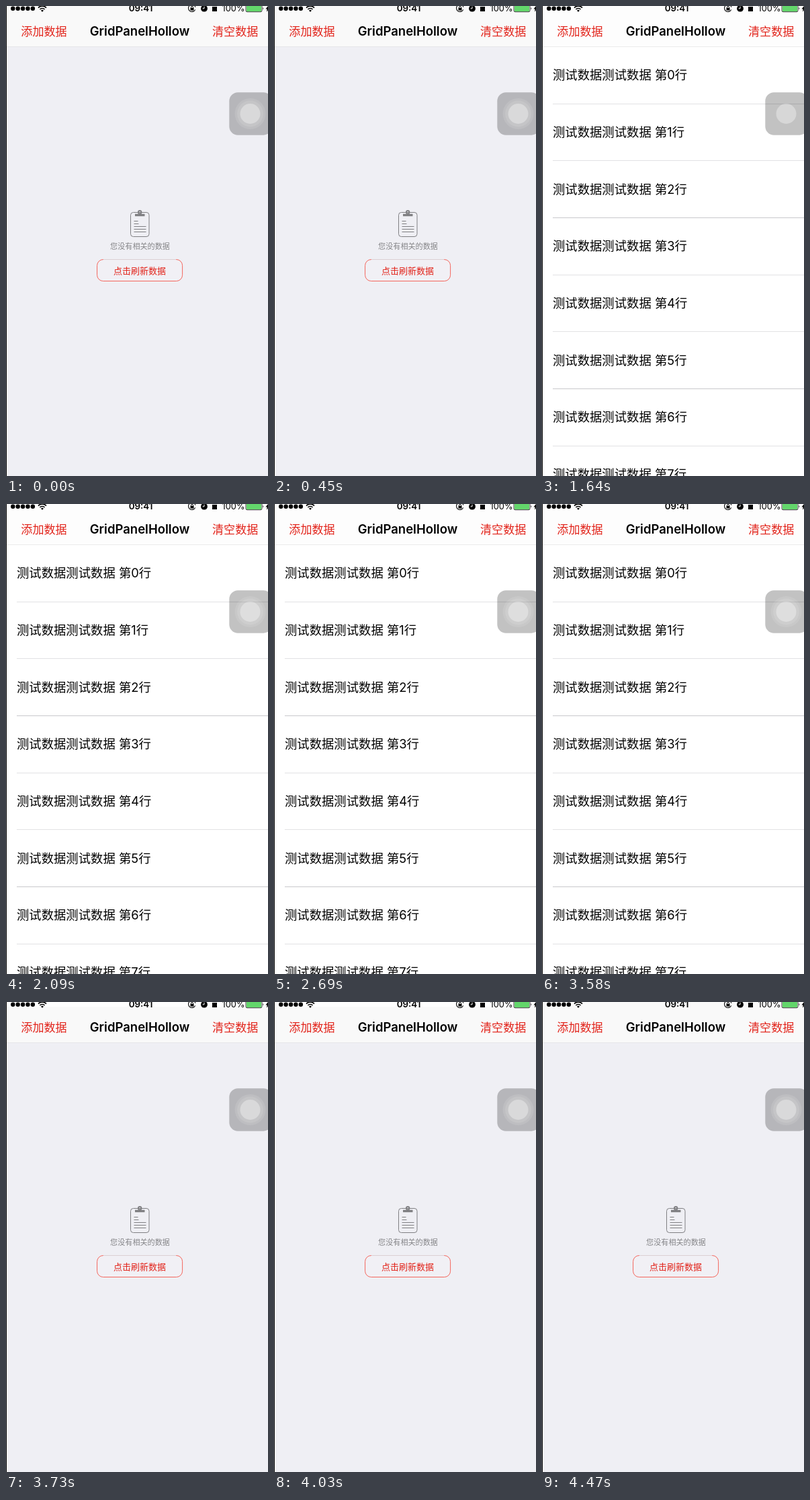
Write an HTML page that moves like this. It is 390 px wide and 698 px high and loops after 6.06 s.

```html
<!DOCTYPE html>
<html lang="zh-CN">
<head>
<meta charset="utf-8">
<title>Empty list</title>
<style>
  html, body { margin: 0; width: 100%; height: 100%; overflow: hidden; background: #efeff4; }
  svg { display: block; width: 100%; height: 100%; }
  text { font-family: Inter, "Noto Sans CJK SC", "Noto Sans CJK JP", sans-serif; }
  .red { fill: #e2231a; }
  .mid { text-anchor: middle; }
  .list, .strip, .ring { animation: 6060ms step-end infinite; }
  .list { visibility: hidden; animation-name: list; }
  .strip { visibility: hidden; animation-name: strip; }
  .ring { animation-name: ring; }
  /* the list is shown from 1640 to 3730 ms */
  @keyframes list {
    0% { visibility: hidden; }
    27.063% { visibility: visible; }
    61.551%, 100% { visibility: hidden; }
  }
  /* the status strip settles later than the page */
  @keyframes strip {
    0% { visibility: hidden; }
    61.551% { visibility: visible; }
    73.762%, 100% { visibility: hidden; }
  }
  @keyframes ring {
    0% { visibility: visible; }
    27.063% { visibility: hidden; }
    29.538%, 100% { visibility: visible; }
  }
</style>
</head>
<body>
<svg viewBox="0 0 390 698">
  <rect width="390" height="698" fill="#efeff4"/>
  <rect width="390" height="60" fill="#f9f9f9"/>
  <rect y="60" width="390" height="1" fill="#e6e6e8"/>
  <rect class="strip" width="390" height="7" fill="#fefefe"/>

  <g fill="none" stroke="#808083">
    <rect x="185.5" y="306.5" width="27.5" height="36" rx="4"/>
    <path d="M190.5 319.5h6M190.5 323.5h7M190.5 327.5h18M190.5 331.5h18M190.5 335.5h18"/>
    <path d="M192 310.5h14.5" stroke-width="3.4"/>
    <circle cx="199.2" cy="306.3" r="2.2" stroke-width="2"/>
  </g>
  <text class="mid" x="199.5" y="361.2" font-size="11.1" fill="#858588">您没有相关的数据</text>
  <rect x="135.6" y="376.5" width="127" height="32" rx="9" fill="#f1f0f5" stroke="#f4574c" stroke-width=".9"/>
  <path d="M145 376.5h108" stroke="#dccfd3"/>
  <text class="mid red" x="199" y="397.5" font-size="13">点击刷新数据</text>

  <g class="list">
    <rect width="390" height="698" fill="#fff"/>
    <rect width="390" height="60" fill="#fdfdfd"/>
    <rect y="60" width="390" height="1" fill="#ebebeb"/>
    <g id="rows" font-size="18.35"></g>
  </g>

  <g class="red" font-size="17.1">
    <text x="22.3" y="43.8">添加数据</text>
    <text x="307" y="43.8">清空数据</text>
  </g>
  <text class="mid" x="199" y="44" font-size="18.5" font-weight="600">GridPanelHollow</text>

  <g id="dots"></g>
  <g fill="none" stroke="#000" stroke-width="1.6">
    <path d="M48 2.6a8.4 8.4 0 0 1 12 0M50.4 5a5 5 0 0 1 7.2 0"/>
    <path d="M54 8.8l-2-2a2.8 2.8 0 0 1 4 0z" fill="#000" stroke="none"/>
    <path d="M281.7 5.4a5.3 5.3 0 1 1 .2-3.8" stroke-width="1.1"/>
    <path d="M275.6 3v-1.4a1.4 1.4 0 0 1 2.8 0v1.4" stroke-width="1"/>
  </g>
  <rect x="274.5" y="2.8" width="5" height="3.8"/>
  <circle cx="295" cy="3.7" r="4.9"/>
  <path d="M295 .8v3h-2.4" fill="none" stroke="#fff"/>
  <rect x="307" y="1" width="7" height="7"/>
  <text class="mid" x="200.6" y="8.4" font-size="13.4" font-weight="600">09:41</text>
  <text x="321.6" y="8.4" font-size="12.8">100%</text>
  <rect x="357" y="-2.5" width="24" height="11.2" rx="2" fill="#fff" stroke="#222" stroke-width=".9"/>
  <rect x="358" y="-2" width="22" height="10" fill="#63d66b"/>
  <path d="M382.5 1.5q1.5 2 0 4z"/>
  <path d="M390 0l-3.5 4.6h2.2L388 8.5l2-2.2z"/>

  <rect x="332.3" y="128.3" width="64" height="63.4" rx="13" fill="#000" fill-opacity=".24"/>
  <g fill="#fff">
    <g class="ring" fill-opacity=".1">
      <circle cx="363.5" cy="160" r="23"/>
      <circle cx="363.5" cy="160" r="19.5"/>
    </g>
    <circle cx="363.5" cy="160" r="15" fill-opacity=".34"/>
  </g>
  <rect width="1" height="698"/>
</svg>
<script>
  const add = (id, name, attrs, label = "") => {
    const el = document.createElementNS("http://www.w3.org/2000/svg", name);
    for (const key in attrs) el.setAttribute(key, attrs[key]);
    el.textContent = label;
    document.getElementById(id).append(el);
  };

  const pitch = 84.67;
  for (let i = 0; i < 8; i++) {
    add("rows", "text", { x: 16, y: 109.3 + i * pitch }, `测试数据测试数据 第${i}行`);
    add("rows", "rect", {
      x: 16, y: Math.floor(145.1 + i * pitch), width: 374, height: 1,
      fill: i % 3 === 2 ? "#c9c9cc" : "#e2e2e4"
    });
  }
  for (let i = 0; i < 5; i++) add("dots", "circle", { cx: 10.3 + i * 7.4, cy: 3.8, r: 3.2 });
</script>
</body>
</html>
```
